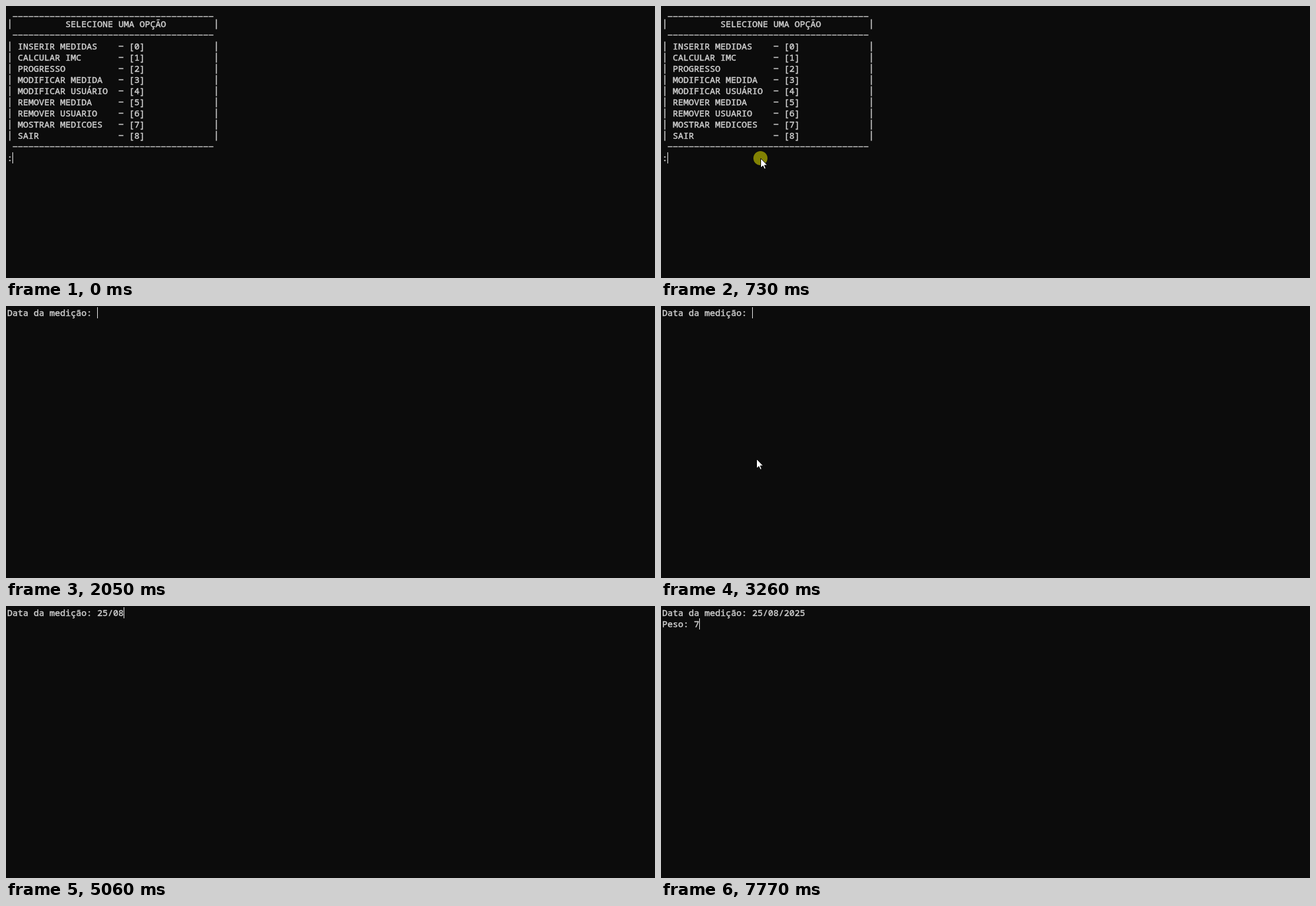
These frames come from a looping animation (1103x463 px, 8000 ms). An HTML page:

```html
<!DOCTYPE html>
<html lang="pt">
<head>
<meta charset="utf-8">
<title>Terminal</title>
<style>
  html, body { margin: 0; width: 100%; height: 100%; overflow: hidden; background: #0c0c0c; }
  svg { display: block; width: 100%; height: 100%; }
  text {
    font: 400 15px "Noto Sans Mono", "DejaVu Sans Mono", monospace;
    font-variant-ligatures: none;
    fill: #ccc;
    stroke: #ccc;
    stroke-width: .5;
    white-space: pre;
  }
  .rule { stroke: #ccc; stroke-width: 1.7; fill: none; }
</style>
</head>
<body>
<svg id="stage" viewBox="0 0 1103 463">
  <g id="menu"></g>
  <text id="line0"></text>
  <text id="line1"></text>
  <text id="choice"></text>
  <rect id="caret" width="1" height="19" fill="#fff"/>
  <g id="pointer">
    <circle id="halo" r="12" fill="#828203"/>
    <path d="M.5 .5V16.5L4.3 13L6.8 18.5L9.2 17.5L6.8 12H11.7Z" fill="#fff" stroke="#000"/>
  </g>
</svg>
<script>
const LOOP = 8000, CELL = 9, ROW = 19, PAD = 2;
const NS = "http://www.w3.org/2000/svg";
const $ = id => document.getElementById(id);
const colX = c => PAD + c * CELL;
const rowY = r => PAD + r * ROW;

const menu = $("menu");
const options = [
  "INSERIR MEDIDAS", "CALCULAR IMC", "PROGRESSO", "MODIFICAR MEDIDA", "MODIFICAR USUÁRIO",
  "REMOVER MEDIDA", "REMOVER USUARIO", "MOSTRAR MEDICOES", "SAIR"
];

function add(tag, attrs, content = "") {
  const el = document.createElementNS(NS, tag);
  for (const key in attrs) el.setAttribute(key, attrs[key]);
  el.textContent = content;
  menu.append(el);
}

function place(el, col, row) {
  el.setAttribute("x", colX(col));
  el.setAttribute("y", rowY(row) + 15);
}

function label(content, col, row) {
  add("text", { x: colX(col), y: rowY(row) + 15 }, content);
}

// A run of hyphens, one per cell
function dashes(col, count, y) {
  add("path", {
    class: "rule", "stroke-dasharray": "8 1",
    d: `M${colX(col) + 0.5} ${y}h${count * CELL - 1}`
  });
}

function walls(row) {
  for (const col of [0, 39]) {
    add("path", { class: "rule", d: `M${colX(col) + 4.5} ${rowY(row) + 1.5}v17` });
  }
}

function buildMenu() {
  dashes(1, 38, 18);
  dashes(1, 38, rowY(2) + 9.5);
  dashes(1, 38, rowY(12) + 9.5);
  walls(1);
  label("SELECIONE UMA OPÇÃO", 11, 1);
  options.forEach((name, i) => {
    const row = i + 3;
    walls(row);
    label(name, 2, row);
    dashes(21, 1, rowY(row) + 9.5);
    label(`[${i}]`, 23, row);
  });
}

const DATE = "25/08/2025";
const dateKeys = [4190, 4250, 4520, 4990, 5060, 5320, 5650, 5720, 5920, 6120];
const caretOff = [[1850, 1920], [2720, 3260], [3790, 4120], [7170, 7700]];
const within = (t, a, b) => t >= a && t < b;

function show(el, on) {
  el.setAttribute("visibility", on ? "inherit" : "hidden");
}

// The pointer sweeps in from the right in discrete steps, then rests
function pointerAt(t) {
  if (within(t, 260, 1190)) {
    const step = Math.floor((t - 260) / 66.25);
    const u = Math.min(1, step / 7), v = 1 - u;
    return [169 + 712 * v * v, 363 * v * v + 2 * 162 * u * v + 259 * u * u];
  }
  return within(t, 2390, 4120) ? [162, 260] : null;
}

function render(t) {
  const inMenu = t < 2050, weighing = t >= 6580;
  const choice = t >= 1260 ? ":0" : ":";
  const date = "Data da medição: " + DATE.slice(0, dateKeys.filter(k => t >= k).length);
  const weight = "Peso: " + (t >= 7770 ? "7" : "");

  show(menu, inMenu);
  $("choice").textContent = inMenu ? choice : "";
  $("line0").textContent = inMenu ? "" : date;
  $("line1").textContent = weighing ? weight : "";

  const active = inMenu ? choice : weighing ? weight : date;
  const row = inMenu ? 13 : weighing ? 1 : 0;
  $("caret").setAttribute("x", colX(active.length));
  $("caret").setAttribute("y", rowY(row));
  show($("caret"), !caretOff.some(([a, b]) => within(t, a, b)));

  const pos = pointerAt(t);
  show($("pointer"), pos);
  show($("halo"), pos && t < 790);
  if (pos) $("pointer").setAttribute("transform", `translate(${pos.map(Math.round)})`);
}

buildMenu();
place($("line0"), 0, 0);
place($("line1"), 0, 1);
place($("choice"), 0, 13);

const start = performance.now();
function tick() {
  render((performance.now() - start) % LOOP);
  requestAnimationFrame(tick);
}
tick();
</script>
</body>
</html>
```
